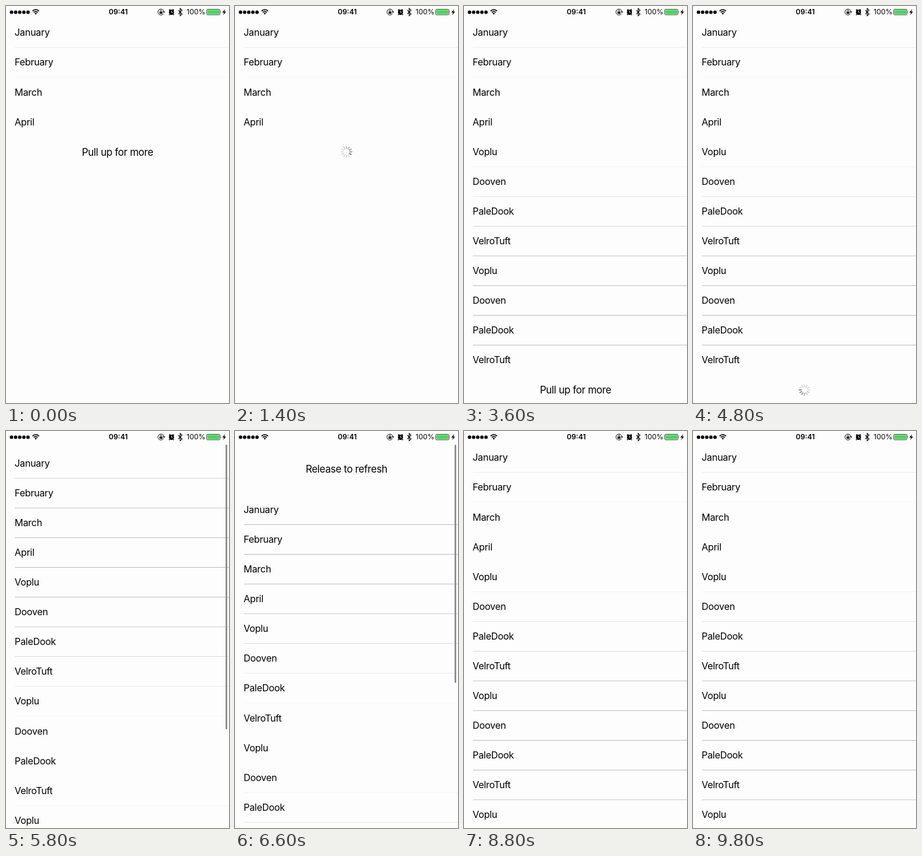
An HTML page for the animation above (10 s loop, 376x668 px).

```html
<!DOCTYPE html>
<html lang="en">
<head>
<meta charset="utf-8">
<title>Pull to refresh list</title>
<style>
  html, body { margin: 0; width: 100%; height: 100%; overflow: hidden; background: #fdfdfd; }
  svg { display: block; width: 376px; height: 668px; }
  text { font-family: Inter, Roboto, sans-serif; fill: #000; }
  .row { font-size: 16px; letter-spacing: -.3px; }
  .hint { font-size: 16.8px; letter-spacing: -.35px; text-anchor: middle; }
  .status { font-size: 12px; }
</style>
</head>
<body>
<svg viewBox="0 0 376 668">
  <defs>
    <clipPath id="view"><rect y="20" width="376" height="648"/></clipPath>
  </defs>
  <rect width="376" height="668" fill="#fdfdfd"/>
  <g clip-path="url(#view)">
    <g id="rows"></g>
    <text id="header" class="hint" x="188">Release to refresh</text>
    <text id="footer" class="hint" x="188">Pull up for more</text>
    <g id="spinner"></g>
    <rect id="bar" x="370.3" y="23" width="2.6" rx="1.3" fill="#898289"/>
  </g>
  <g id="status">
    <g id="dots"></g>
    <g fill="none" stroke="#000" stroke-width="1.7">
      <path d="M44.8 8.6a7.4 7.4 0 0 1 10.9 0"/>
      <path d="M46.9 10.9a4.6 4.6 0 0 1 6.7 0"/>
    </g>
    <path d="M48.3 12.4a2.8 2.8 0 0 1 3.9 0L50.25 14.6z"/>
    <text class="status" x="189.3" y="14.4" text-anchor="middle" font-weight="600">09:41</text>
    <g fill="none" stroke="#000">
      <path d="M265.6 12.6a5 5 0 1 1 .6-3"/>
      <path d="M259.9 9.6v-1.2a1.4 1.4 0 0 1 2.8 0v1.2" stroke-width=".9"/>
    </g>
    <path d="M264.3 9.2h4l-2 2.6z"/>
    <rect x="258.9" y="9.4" width="4.8" height="3.6" rx=".5"/>
    <circle cx="279" cy="10.6" r="4.3"/>
    <path d="M275 7.6l2-1.9M283 7.6l-2-1.9M276 14l-1 1.2M282 14l1 1.2" stroke="#000" stroke-width="1.7"/>
    <path d="M279 8v2.8h2.2" fill="none" stroke="#fdfdfd" stroke-width=".9"/>
    <path d="M290.5 7l6.4 6.5-3.3 3V4l3.3 3-6.4 6.5" fill="none" stroke="#000" stroke-width="1.1"/>
    <text class="status" x="304.6" y="14.4">100%</text>
    <rect x="338.5" y="5.5" width="22.4" height="9.4" rx="1.6" fill="none" stroke="#333" stroke-width=".9"/>
    <rect x="339.6" y="6.6" width="20.2" height="7.2" rx=".6" fill="#48d75c"/>
    <path d="M361.8 8.6q1.6 1.6 0 3.2z" fill="#333"/>
    <path d="M369.4 5.2l-4.6 5.7h2.8l-1.4 4.3 4.9-5.8h-2.9z"/>
  </g>
</svg>
<script>
const LOOP = 10000, ROW = 50.075, TOP = 20, MAX_ROWS = 16;
const MONTHS = ["January", "February", "March", "April"];
const FIRMS = ["Voplu", "Dooven", "PaleDook", "VelroTuft"];

// [time, list offset]: three pulls up, then one pull down with a refresh
const SCROLL = [
  [300, 0], [700, -44], [850, -44], [1150, 0],
  [2250, 0], [2550, -44], [2650, -44], [2950, 0],
  [3850, 0], [4150, -44], [4300, -44], [4600, 0],
  [5500, 0], [5800, 9.475], [6300, 78], [6600, 87.625],
  [7550, 87.625], [7900, 0]
];
// [time, row count]
const LOADS = [[0, 4], [2100, 8], [3450, 12], [5100, 16]];
const FOOTER_BUSY = [[900, 2100], [2700, 3450], [4350, 5100]];
const HEADER_BUSY = [6750, 7550];

const $ = id => document.getElementById(id);
const clamp = v => Math.max(0, Math.min(1, v));
const within = (t, [a, b]) => t >= a && t < b;

function add(parent, tag, attrs) {
  const el = document.createElementNS("http://www.w3.org/2000/svg", tag);
  for (const k in attrs) el.setAttribute(k, attrs[k]);
  return parent.appendChild(el);
}
function show(el, on) {
  el.setAttribute("visibility", on ? "visible" : "hidden");
}

for (let i = 0; i < 5; i++) add($("dots"), "circle", { cx: 9.3 + i * 6.95, cy: 10.4, r: 2.9 });

const rows = Array.from({ length: MAX_ROWS }, (_, i) => {
  const label = add($("rows"), "text", { class: "row", x: 14.5 });
  label.textContent = i < 4 ? MONTHS[i] : FIRMS[i % 4];
  const line = add($("rows"), "rect", { x: 15, width: 361, height: 1, fill: "#bab9be" });
  return { label, line };
});

const spokes = Array.from({ length: 12 }, (_, i) => add($("spinner"), "line", {
  y1: -5.4, y2: -9.1, stroke: "#6e6e74", "stroke-width": 1.8,
  "stroke-linecap": "round", transform: `rotate(${i * 30})`
}));

function scrollAt(t) {
  const n = SCROLL.findIndex(k => k[0] > t);
  if (n <= 0) return 0;
  const [t0, a] = SCROLL[n - 1], [t1, b] = SCROLL[n];
  const p = (t - t0) / (t1 - t0);
  return a + (b - a) * p * p * (3 - 2 * p);
}

function drawSpinner(t, y) {
  $("spinner").setAttribute("transform", `translate(188 ${y})`);
  const head = Math.floor(t * 12 / 1000) % 12;
  spokes.forEach((s, i) => {
    const age = (head - i + 12) % 12;
    s.setAttribute("opacity", Math.max(.25, .85 - age * .1));
  });
}

function draw(t) {
  const off = scrollAt(t);
  const count = LOADS.filter(l => l[0] <= t).pop()[1];
  const top = TOP + off;

  rows.forEach(({ label, line }, i) => {
    const on = i < count;
    show(label, on);
    show(line, on && i < count - 1);
    label.setAttribute("y", top + i * ROW + 30.4);
    // hairlines fade with their position between two pixel rows
    const y = top - .25 + (i + 1) * ROW;
    line.setAttribute("y", Math.floor(y));
    line.setAttribute("opacity", .5 - .5 * Math.cos(2 * Math.PI * y));
  });

  const footY = top + count * ROW + 25;
  const headY = top - 44;
  const footBusy = FOOTER_BUSY.some(b => within(t, b));
  const headBusy = within(t, HEADER_BUSY);

  $("footer").setAttribute("y", footY + 6.2);
  show($("footer"), !footBusy);
  $("header").setAttribute("y", headY + 6.2);
  show($("header"), within(t, [5500, HEADER_BUSY[0]]));
  show($("spinner"), footBusy || headBusy);
  drawSpinner(t, headBusy ? headY : footY);

  $("bar").setAttribute("height", 488.5 - Math.max(0, off));
  $("bar").setAttribute("opacity", Math.min(clamp((t - 5450) / 150), clamp((7250 - t) / 300)));
}

function tick() {
  draw(performance.now() % LOOP);
  requestAnimationFrame(tick);
}
tick();
</script>
</body>
</html>
```
